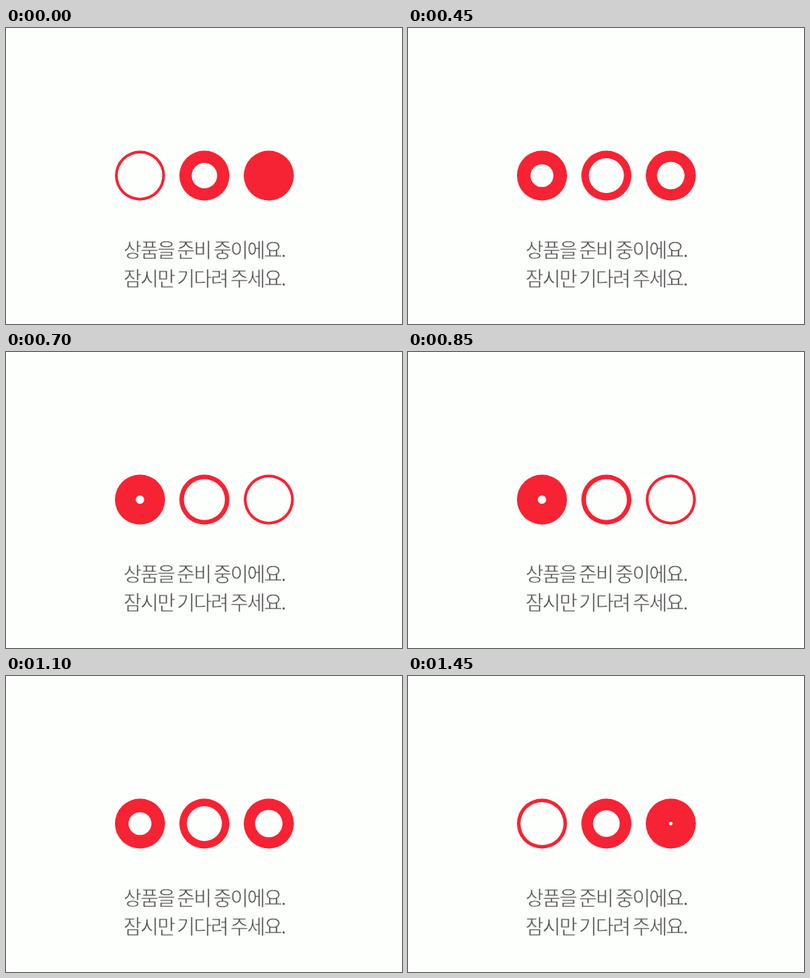
Animation of 498 by 373 pixels, one loop 1500 ms. Source, as an HTML page:

```html
<!DOCTYPE html>
<html lang="ko">
<head>
<meta charset="utf-8">
<title>잠시만 기다려 주세요</title>
<style>
  html, body { margin: 0; width: 100%; height: 100%; overflow: hidden; background: #fdfffc; }
  svg { display: block; }
  /* The background-coloured outline thins the strokes to a light weight */
  text {
    font: 300 25px "Noto Sans CJK KR", "Noto Sans CJK", sans-serif;
    letter-spacing: -1.78px;
    word-spacing: -1.7px;
    fill: #505050;
    stroke: #fdfffc;
    stroke-width: .5px;
  }
  .ring { fill: #f52333; }
  .hole { fill: #fdfffc; }
</style>
</head>
<body>
<svg width="498" height="373" viewBox="0 0 498 373">
  <g class="ring">
    <circle cx="168.5" cy="186" r="31.5"/>
    <circle cx="249.5" cy="186" r="31.5"/>
    <circle cx="330.5" cy="186" r="31.5"/>
  </g>
  <g class="hole">
    <circle cx="168.5" cy="186"/>
    <circle cx="249.5" cy="186"/>
    <circle cx="330.5" cy="186"/>
  </g>
  <text x="147.7" y="288.5">상품을 준비 중이에요.</text>
  <text x="147.7" y="324.5">잠시만 기다려 주세요.</text>
</svg>
<script>
const LOOP = 1500, STEP = 50, TURN = 25, MAX_HOLE = 28;
const holes = document.querySelectorAll('.hole circle');
// Hole radius at the turning point and its growth per ms away from it
const motion = [[29.8, -0.0363], [15.6, 0.0151], [-1, 0.043]];

function draw() {
  const t = Math.floor(performance.now() % LOOP / STEP) * STEP;
  const swing = LOOP / 2 - Math.abs(Math.abs(t - TURN) - LOOP / 2);
  motion.forEach(([start, rate], i) => {
    const r = Math.max(0, Math.min(MAX_HOLE, start + rate * swing));
    holes[i].setAttribute('r', r.toFixed(2));
  });
  requestAnimationFrame(draw);
}
draw();
</script>
</body>
</html>
```
